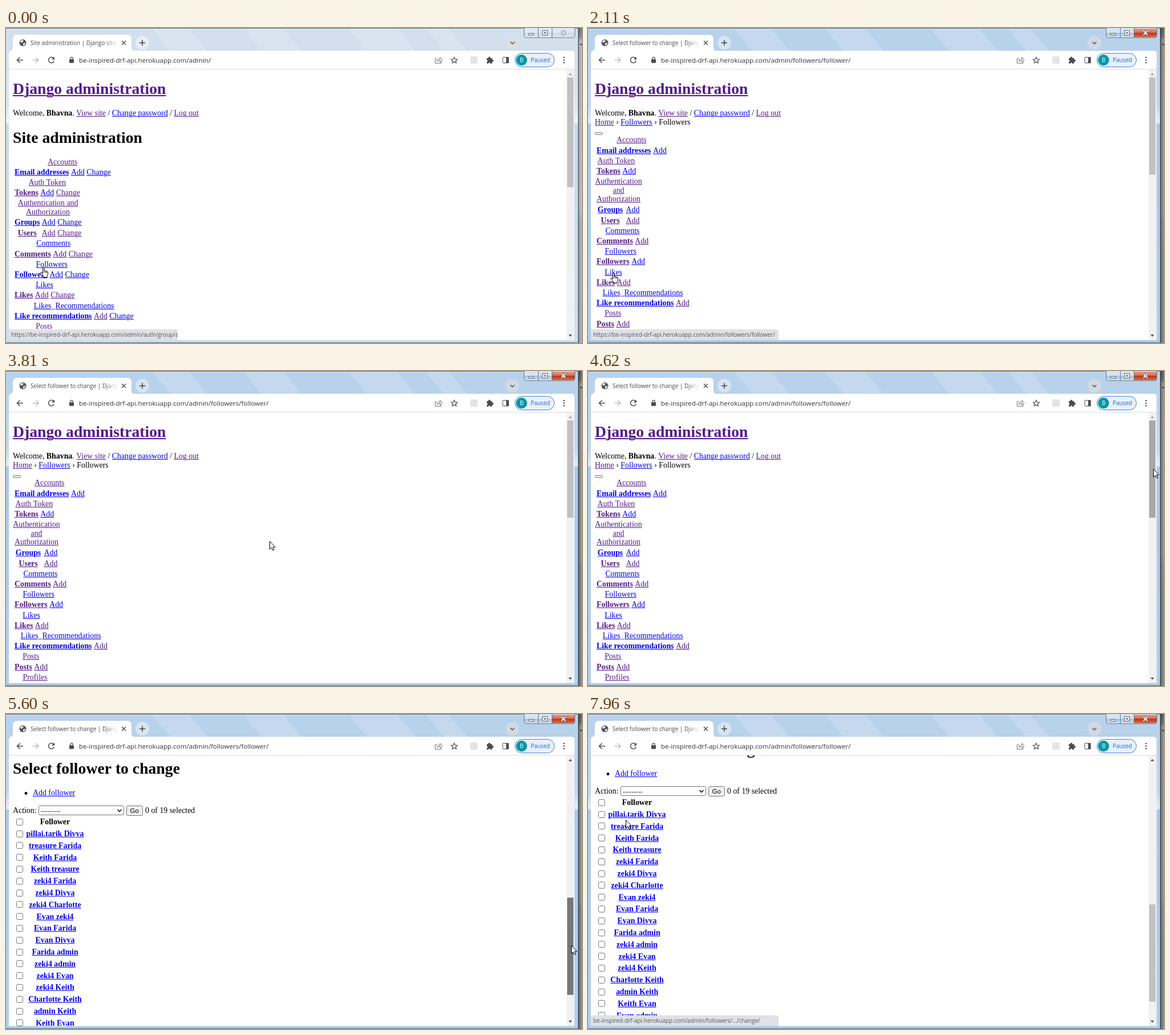
Animation, 1010 px wide and 554 px high, one loop 8 s. Source, as an HTML page with a canvas:

```html
<!DOCTYPE html>
<html lang="en">
<head>
<meta charset="utf-8">
<title>Site administration</title>
<style>
html, body { margin: 0; width: 100%; height: 100%; overflow: hidden; background: #fff; }
canvas { display: block; }
</style>
</head>
<body>
<canvas id="stage" width="1010" height="554"></canvas>
<script>
const ctx = document.getElementById('stage').getContext('2d');
const LOOP = 8000, PAGE_LOAD = 1940, ACTIVATE = 1380;
const SERIF = '13.85px "Liberation Serif", serif';
const BOLD = 'bold ' + SERIF;
const H1 = 'bold 27.7px "Liberation Serif", serif';
const SANS = '"Open Sans", sans-serif';
const SMALL = '9.92px ' + SANS;
const CONTROL = '11.55px "Liberation Sans", sans-serif';
const LINK = '#0000ee', VISITED = '#551a8b';
const HOST = 'be-inspired-drf-api.herokuapp.com/admin/';
const tint = c => c === 'v' ? VISITED : LINK;

// caption, caption colour, rows of [name, colours of name / Add / Change]
const apps = [
  ['Accounts', 'v', [['Email addresses', 'lll']]],
  ['Auth Token', 'v', [['Tokens', 'vlv']]],
  ['Authentication and Authorization', 'v', [['Groups', 'lll'], ['Users', 'vvv']]],
  ['Comments', 'l', [['Comments', 'vvv']]],
  ['Followers', 'l', [['Followers', 'lll']]],
  ['Likes', 'l', [['Likes', 'vvv']]],
  ['Likes_Recommendations', 'l', [['Like recommendations', 'lvl']]],
  ['Posts', 'v', [['Posts', 'vvv']]],
  ['Profiles', 'v', [['Profiles', 'vvv']]],
  ['Recommendations', 'v', [['Recommendations', 'vvv']]],
  ['Sites', 'l', [['Sites', 'lll']]],
  ['Social Accounts', 'l', [['Social accounts', 'lll'], ['Social application tokens', 'lll'], ['Social applications', 'lll']]]
];

const people = ['pillai.tarik Divya', 'treasure Farida', 'Keith Farida', 'Keith treasure',
  'zeki4 Farida', 'zeki4 Divya', 'zeki4 Charlotte', 'Evan zeki4', 'Evan Farida', 'Evan Divya',
  'Farida admin', 'zeki4 admin', 'zeki4 Evan', 'zeki4 Keith', 'Charlotte Keith', 'admin Keith',
  'Keith Evan', 'Evan admin', 'Evan Keith'];

// first step, last step, number of steps, destination
const pointerMoves = [
  [70, 70, 1, 60, 427], [310, 470, 3, 50, 439], [540, 620, 2, 39, 427], [870, 930, 2, 39, 430],
  [2640, 2830, 4, 250, 254], [3140, 3330, 4, 514, 300], [3400, 3590, 4, 331, 315],
  [3810, 3810, 1, 462, 299], [3870, 3930, 2, 747, 270], [4120, 4300, 4, 988, 181],
  [4500, 4620, 3, 991, 172], [4870, 5000, 3, 991, 354], [5390, 5600, 4, 991, 407],
  [6120, 6270, 3, 992, 420], [6680, 6790, 3, 481, 367], [7040, 7280, 5, 178, 240],
  [7530, 7960, 7, 66, 186]
];
const scrollMoves = [
  [4870, 5000, 3, 451], [5080, 5080, 1, 505], [5390, 5600, 4, 653], [6120, 6270, 3, 687]
];

function follow(moves, start, t) {
  let at = start;
  for (const [from, to, steps, ...goal] of moves) {
    if (t < from) break;
    const done = steps === 1 ? 1 : Math.floor((t - from) / (to - from) * (steps - 1) + 1e-6) + 1;
    const k = Math.min(1, done / steps);
    at = at.map((v, i) => v + (goal[i] - v) * k);
  }
  return at;
}

function box(x, y, w, h, fill, r = 0, stroke) {
  ctx.beginPath();
  ctx.roundRect(x, y, w, h, r);
  if (fill) { ctx.fillStyle = fill; ctx.fill(); }
  if (stroke) { ctx.strokeStyle = stroke; ctx.lineWidth = 1; ctx.stroke(); }
}

function disc(x, y, r, fill) {
  ctx.beginPath();
  ctx.arc(x, y, r, 0, 7);
  ctx.fillStyle = fill;
  ctx.fill();
}

function trace(d, color, width = 1.5, fill) {
  const p = new Path2D(d);
  if (fill) { ctx.fillStyle = fill; ctx.fill(p); }
  if (color) { ctx.strokeStyle = color; ctx.lineWidth = width; ctx.stroke(p); }
}

function ramp(x0, y0, x1, y1, ...stops) {
  const g = ctx.createLinearGradient(x0, y0, x1, y1);
  stops.forEach(([at, c]) => g.addColorStop(at, c));
  return g;
}

const shade = (y0, y1, ...stops) => ramp(0, y0, 0, y1, ...stops);

function width(s, font) {
  ctx.font = font;
  return ctx.measureText(s).width;
}

function text(s, x, y, font, color = '#000') {
  ctx.font = font;
  ctx.fillStyle = color;
  ctx.fillText(s, x, y);
}

// y is the middle of the capitals; returns the right end
function word(s, x, y, font = SERIF, color) {
  const big = font === H1, w = width(s, font);
  const base = Math.round(y + (big ? 9 : 4.4));
  if (color) {
    ctx.fillStyle = color;
    ctx.fillRect(x, base + (big ? 2 : 1), w, big ? 2 : 1);
    ctx.strokeStyle = '#fff';
    ctx.lineWidth = 1.5;
    ctx.strokeText(s, x, base);
  }
  text(s, x, base, font, color);
  return x + w;
}

function centred(s, x, y, font, color) {
  word(s, x - width(s, font) / 2, y, font, color);
}

function sections(y, list) {
  const addW = width('Add', SERIF), changeW = width('Change', SERIF);
  for (const [caption, hue, rows] of apps) {
    const wraps = caption.startsWith('Authentication');
    let nameW = Math.max(...rows.map(r => width(r[0], BOLD)));
    if (wraps && list) nameW += 3.7;
    const addX = 15 + nameW + 3.5, changeX = addX + addW + 3.5;
    let end = (list ? addX + addW : changeX + changeW) + 2.6;
    if (wraps && list) end += 2;
    const lines = !wraps ? [caption] : list ? caption.split(' ') : ['Authentication and', 'Authorization'];
    lines.forEach((s, i) => centred(s, (12 + end) / 2, y + i * 15.6, SERIF, tint(hue)));
    y += (lines.length - 1) * 15.6 + 18.19;
    rows.forEach(([name, hues], i) => {
      if (i) y += 19.05;
      const own = list && name === 'Followers' ? 'v' : hues[0];
      centred(name, 15 + nameW / 2, y, BOLD, tint(own));
      word('Add', addX, y, SERIF, tint(hues[1]));
      if (!list) word('Change', changeX, y, SERIF, tint(hues[2]));
    });
    y += 18.19;
  }
}

function checkbox(y) {
  box(18.5, Math.round(y - 6) + 0.5, 11, 11, '#fff', 2, '#767676');
}

function followerList() {
  word('Select follower to change', 12, 749, H1);
  disc(35, 792.5, 2.4, '#000');
  word('Add follower', 47, 792, SERIF, LINK);
  word('Action:', 12, 822.5);
  box(57.5, 814.5, 149, 16, '#fff', 2, '#767676');
  text('---------', 61, 826.5, CONTROL);
  trace('M195.5 821l3.5 3.5l3.5-3.5', '#111', 1.6);
  box(211.5, 814.5, 28, 17, '#efefef', 2, '#767676');
  text('Go', 217.5, 827, CONTROL);
  word('0 of 19 selected', 244, 822.5);
  checkbox(843);
  centred('Follower', 86, 843, BOLD);
  people.forEach((name, i) => {
    const y = 863.5 + i * 20.8;
    checkbox(y);
    centred(name, 86, y, BOLD, LINK);
  });
}

function page(list, scroll) {
  ctx.save();
  box(5, 73, 992, 476, '#fff');
  ctx.clip();
  ctx.translate(0, -Math.round(scroll));
  word('Django administration', 12, 107, H1, VISITED);
  let x = word('Welcome, ', 12, 150);
  x = word('Bhavna', x, 150, BOLD);
  x = word('. ', x, 150);
  x = word('View site', x, 150, SERIF, VISITED);
  x = word(' / ', x, 150);
  x = word('Change password', x, 150, SERIF, LINK);
  x = word(' / ', x, 150);
  word('Log out', x, 150, SERIF, VISITED);
  if (list) {
    x = word('Home', 12, 166, SERIF, VISITED);
    x = word(' › ', x, 166);
    x = word('Followers', x, 166, SERIF, LINK);
    word(' › Followers', x, 166);
    box(12.5, 183.5, 13, 4, '#efefef', 2, '#767676');
    sections(197, true);
    followerList();
  } else {
    word('Site administration', 12, 193, H1);
    sections(235.3, false);
  }
  ctx.restore();
}

function scrollbar(list, scroll, t) {
  box(983, 73, 14, 476, '#f1f1f1');
  let color = '#c1c1c1';
  if (t >= 4870 && t < 6610) color = '#787878';
  else if (t >= 4300 && t < 6680) color = '#a8a8a8';
  box(984, Math.round(87 + scroll / 2.77), 11, list ? 171 : 193, color);
  trace('M986.5 83h6l-3-4z', null, 0, scroll ? '#505050' : '#a3a3a3');
  trace('M986.5 539h6l-3 4z', null, 0, '#505050');
}

function status(t) {
  let label = 'https://' + HOST + 'followers/follower/', right = 334, alpha = 1;
  if (t < 70) {
    label = 'https://' + HOST + 'auth/group/add/';
    right = 301;
  } else if (t >= 7740) {
    label = HOST + 'followers/.../change/';
  } else if (t >= 2260) return;
  else if (t >= 2180) alpha = 0.5;
  ctx.save();
  ctx.globalAlpha = alpha;
  box(5, 530, right - 5, 19, '#dee1e6', [0, t < 70 ? 0 : 4, 0, 0]);
  ctx.clip();
  text(label, 9, 543, SMALL, '#54585d');
  ctx.restore();
}

function glass(active) {
  box(0, 0, 1010, 554, active ? '#b9d2eb' : '#d3dfed');
  const side = active
    ? [[0, '#b9d2eb'], [0.25, '#c0d7ee'], [0.3, '#e3eff9'], [0.305, '#a9c9e9'], [1, '#b2cfea']]
    : [[0, '#d3dfed'], [0.25, '#dae5f0'], [0.3, '#eef4fa'], [0.305, '#c9daeb'], [1, '#d0deec']];
  box(0, 0, 5, 554, shade(0, 554, ...side));
  box(997, 0, 6, 554, shade(0, 554, ...side));
  ctx.save();
  ctx.beginPath();
  ctx.rect(0, 1, 1003, 40);
  ctx.clip();
  ctx.globalAlpha = 0.2;
  for (const [x, w] of [[255, 65], [415, 70], [600, 85], [735, 40]]) {
    trace(`M${x} 0h${w}l34 41h${-w}z`, null, 0, '#edf5fc');
  }
  ctx.globalAlpha = 1;
  box(0, 1, 1003, 1, active ? '#d8e7f5' : '#edf3f9');
  ctx.restore();
  box(0, 0, 1003, 1, '#52606f');
  box(0, 549, 1003, 4, active ? '#accae8' : '#cddcea');
  box(0, 553, 1003, 1, '#5b6a78');
  box(1003, 0, 1, 554, '#3c4650');
  // window behind, under the front window's shadow
  box(1004, 0, 6, 554, shade(0, 554, [0, '#8f979f'], [0.03, '#aeb5bc'], [0.04, '#dfe3e8'], [0.58, '#e3e7ec'], [0.62, '#cbd9e7'], [1, '#c5d6e7']));
  trace('M1006 28h4v3z', null, 0, '#333');
  const dark = active ? 0.55 : 0.3;
  box(1004, 0, 6, 554, ramp(1004, 0, 1010, 0, [0, `rgba(0,0,0,${dark})`], [1, `rgba(0,0,0,${dark / 2})`]));
}

function captionButtons(active) {
  const face = active ? ['#d5e4f3', '#a5c1dd'] : ['#e0e9f2', '#cbd9e7'];
  const pale = shade(0, 17, [0, face[0]], [0.48, face[0]], [0.52, face[1]], [1, face[0]]);
  box(908.5, -4.5, 89, 21.5, pale, 4, '#66788c');
  if (active) {
    box(957, 1, 40, 15.5, shade(0, 17, [0, '#e5a596'], [0.48, '#d46a55'], [0.52, '#b9321b'], [1, '#d77755']), [0, 0, 4, 0]);
  }
  trace('M933.5 0v17M957.5 0v17', '#66788c', 1);
  box(916.5, 9.5, 9, 3, '#fff', 0.5, '#4d5967');
  box(940.5, 4.5, 9, 8, '#fff', 0.5, '#4d5967');
  box(943.5, 7.5, 3, 2, null, 0, '#4d5967');
  const cross = 'M974 5l7 7M981 5l-7 7';
  trace(cross, '#4d5967', 3.6);
  trace(cross, '#fff', 1.9);
}

function chrome(active, list) {
  const ink = '#494d51';
  glass(active);
  captionButtons(active);
  box(12, 12, 208, 32, '#fff', [7, 7, 0, 0]);
  trace('M5 41q7 0 7-7v7zM227 41q-7 0-7-7v7z', null, 0, '#fff');
  box(5, 40, 992, 33, '#fff', [5, 5, 0, 0]);
  box(5, 72, 992, 1, '#dadce0');

  disc(29.5, 26, 6, '#4f5459');
  trace('M25 23q3-3 6-1l-2 3l-3 1zM30 27l4-1q0 4-4 5z', null, 0, '#e8eaed');
  ctx.save();
  ctx.beginPath();
  ctx.rect(40, 14, 156, 24);
  ctx.clip();
  text(list ? 'Select follower to change | Django site admin' : 'Site administration | Django site admin', 43, 30, SMALL, '#45494d');
  box(172, 14, 24, 24, ramp(172, 0, 196, 0, [0, 'rgba(255,255,255,0)'], [1, '#fff']));
  ctx.restore();
  trace('M203 22.5l7 7M210 22.5l-7 7', ink, 1.4);
  disc(239, 26, 12, active ? '#d6e4f3' : '#e6edf5');
  trace('M234 26h10M239 21v10', '#3c4043', 1.5);
  disc(888, 26, 12, active ? '#d0dae4' : '#d9dfe5');
  trace('M884.5 24.5l3.5 3.5l3.5-3.5', ink, 1.5);

  trace('M30 56.5H19.5M24.5 51.5l-5 5l5 5', ink);
  trace('M46.5 56.5H57M52 51.5l5 5l-5 5', '#babcbe');
  trace('M83.5 53.2A5 5 0 1 0 84.3 58', ink);
  trace('M85 50.5v5h-5z', null, 0, ink);
  box(111, 55, 8, 6.5, ink, 1);
  trace('M112.8 55v-1.5a2.2 2.2 0 0 1 4.4 0V55', ink, 1.2);
  text(HOST + (list ? 'followers/follower/' : ''), 128, 61, '11.55px ' + SANS, '#303337');

  trace('M756 54h-3.5v8h10.5v-3M756 59q0-4.5 5-4.5v-3l4 4.5l-4 4v-3q-3 0-5 2z', '#6a6e72', 1);
  trace('M786 51.2l1.5 3.6l4 .3l-3 2.6l1 3.8l-3.5-2.1l-3.5 2.1l1-3.8l-3-2.6l4-.3z', ink, 1.2);
  box(814, 50, 13, 13, '#e3e4e6', 2);
  box(843, 53, 9.5, 9.5, ink, 1);
  disc(847.5, 52.3, 1.9, ink);
  disc(853, 57.5, 1.9, ink);
  disc(843.2, 58, 1.5, '#fff');
  disc(847.5, 62.3, 1.5, '#fff');
  box(871, 51.5, 10, 10, '#fff', 1, ink);
  box(877, 51, 4.5, 11, ink);
  box(892.5, 44.5, 69, 24, '#e8f0fe', 12, '#3f7fd0');
  disc(904, 56.5, 9.7, '#0097a7');
  text('B', 901, 60, SMALL, '#fff');
  text('Paused', 920, 60, SMALL, '#1f66c9');
  [52, 56.5, 61].forEach(y => disc(978.5, y, 1.3, ink));
}

function pointer(t) {
  const [x, y] = follow(pointerMoves, [60, 420], t).map(Math.round);
  ctx.save();
  ctx.translate(x, y);
  if (t < 2640) {
    trace('M4.5 12V2q0-1.5 1.3-1.5T7 2v5q1.5-1 2.3.5q1.4-.6 2 .6q2-.2 2.2 1.7V13l-1.5 3v2.5H5.5V16L1 11.5q-.8-1.5.7-2q1.3 0 2.8 2.5z', '#000', 1, '#fff');
    trace('M7 7v3.5M9.3 7.5V11M11.4 8v3', '#000', 0.8);
  } else {
    trace('M.5 .5v14l3.2-3l2.3 5l2.2-1l-2.3-4.8h4.3z', '#000', 1, '#fff');
  }
  ctx.restore();
}

function draw(now) {
  const t = now % LOOP;
  const list = t >= PAGE_LOAD;
  const [scroll] = follow(scrollMoves, [0], t);
  chrome(t >= ACTIVATE, list);
  page(list, scroll);
  scrollbar(list, scroll, t);
  status(t);
  pointer(t);
}

const start = performance.now();
function tick() {
  draw(performance.now() - start);
  requestAnimationFrame(tick);
}
tick();
</script>
</body>
</html>
```
